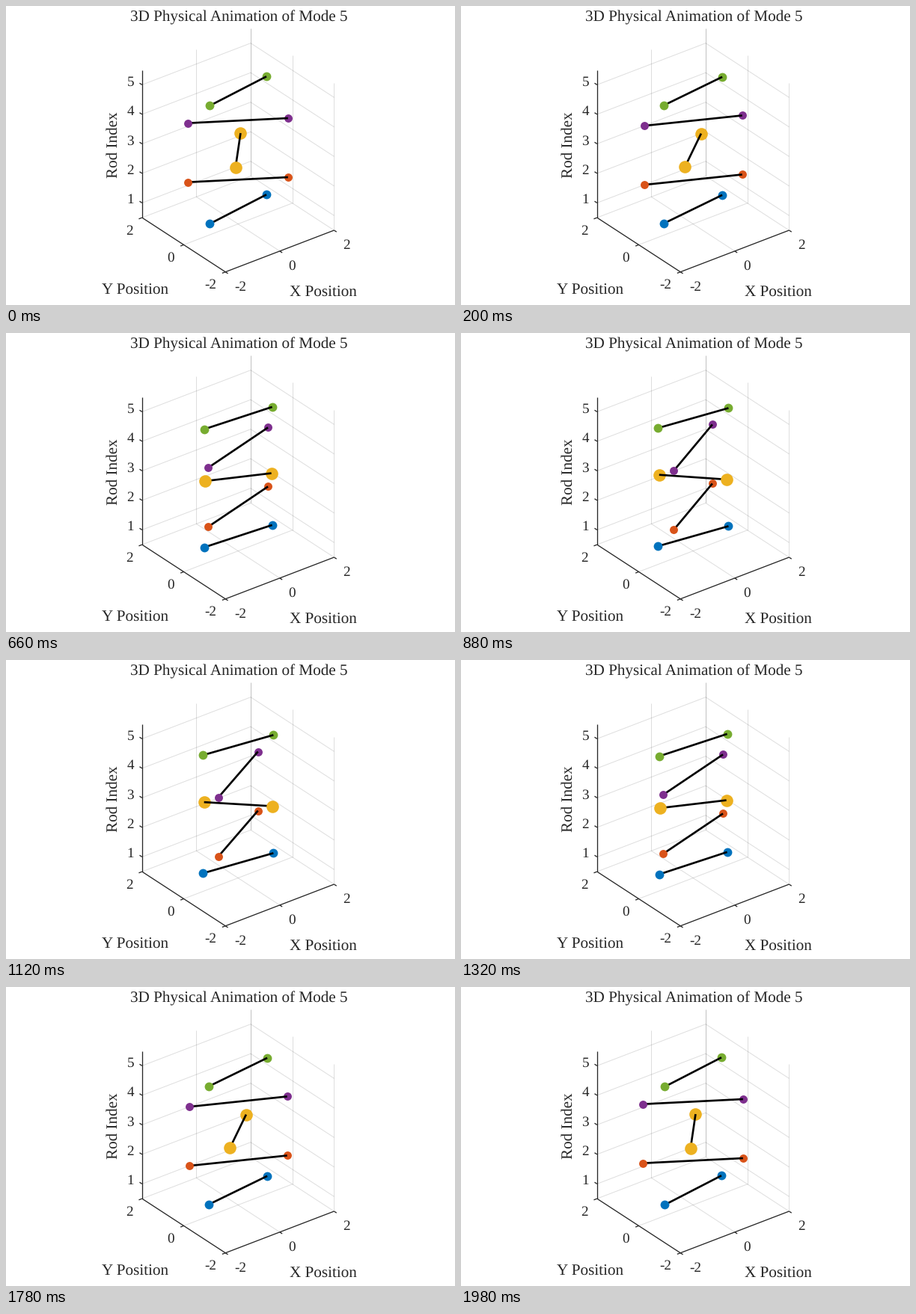
Write a matplotlib script that moves like this. It is 600 by 400 pixels and loops after 2000 ms.

```python
import numpy as np
import matplotlib.pyplot as plt
from matplotlib.animation import FuncAnimation

W, H, DPI = 600, 400, 100
PT = 72 / DPI                      # points per pixel
FRAMES, LOOP = 100, 2000

plt.rcParams.update({
    "font.family": "Liberation Serif",
    "text.hinting": "no_hinting",
    "axes.unicode_minus": False,
})

# Orthographic view: azimuth -37.5 deg, elevation 30 deg
AZ, EL = np.radians(37.5), np.radians(30)
SCALE, Z_SCALE = 45.75, 39.5
CENTER = np.array([310.1, 291.6])  # screen point of (0, 0, 0.5)

INK = "#262626"
TICK_FONT, LABEL_FONT = 19.2, 21.1              # px
COLORS = ["#0072BD", "#D95319", "#EDB120", "#7E2F8E", "#77AC30"]
HALF = [1.19, 1.465, 1.0, 1.465, 1.19]          # half length of each rod
SWING = np.radians([8.4, -31.8, 48.3, -31.8, 8.4])  # mode shape
SIZES = [11.8, 10.9, 16.6, 10.9, 11.8]          # marker diameter in px


def project(x, y, z):
    u = SCALE * (x * np.cos(AZ) - y * np.sin(AZ))
    v = SCALE * np.sin(EL) * (x * np.sin(AZ) + y * np.cos(AZ))
    return np.array([CENTER[0] + u, CENTER[1] - v - Z_SCALE * (z - 0.5)])


fig = plt.figure(figsize=(W / DPI, H / DPI), dpi=DPI, facecolor="white")
ax = fig.add_axes([0, 0, 1, 1])
ax.set(xlim=(0, W), ylim=(H, 0))
ax.axis("off")


def segment(a, b, **style):
    p, q = project(*a), project(*b)
    ax.plot([p[0], q[0]], [p[1], q[1]], solid_capstyle="butt", **style)


def grid(a, b):
    segment(a, b, color=INK, alpha=0.15, lw=1 * PT, zorder=1)


def axis(a, b):
    segment(a, b, color=INK, lw=1.3 * PT, zorder=2)


def label(x, y, text, size=LABEL_FONT, ha="center", rotation=0):
    ax.text(x, y, text, fontsize=size * PT, color=INK, ha=ha, va="baseline",
            rotation=rotation, rotation_mode="anchor", zorder=2)


def tick_label(point, dx, dy, value, ha):
    x, y = project(*point)
    label(x + dx, y + dy, str(value), TICK_FONT, ha)


LO, HI, Z0, Z1 = -2, 2, 0.5, 5.5
TICK = 0.12

for v in (-2, 0, 2):
    if v > LO:
        grid((v, LO, Z0), (v, HI, Z0))
        grid((v, HI, Z0), (v, HI, Z1))
        grid((LO, v, Z0), (HI, v, Z0))
    grid((HI, v, Z0), (HI, v, Z1))
    axis((v, LO, Z0), (v, LO - TICK, Z0))
    axis((LO, v, Z0), (LO - TICK, v, Z0))
    tick_label((v, LO, Z0), 11.7, 24.9, v, "left")
    tick_label((LO, v, Z0), -12.4, 22.6, v, "right")

for k in range(1, 6):
    grid((LO, HI, k), (HI, HI, k))
    grid((HI, LO, k), (HI, HI, k))
    axis((LO, HI, k), (LO, HI + TICK, k))
    tick_label((LO, HI, k), -10.8, 1, k, "right")

axis((LO, LO, Z0), (HI, LO, Z0))
axis((LO, LO, Z0), (LO, HI, Z0))
axis((LO, HI, Z0), (LO, HI, Z1))

label(311, 20, "3D Physical Animation of Mode 5")
label(172.8, 385.4, "Y Position")
label(423.6, 389, "X Position")
label(149, 185.3, "Rod Index", rotation=90)


def dot(color, size, zorder):
    return ax.plot([], [], "o", color=color, ms=size * PT, mew=0,
                   zorder=zorder)[0]


# The far end lies behind its rod, the near end in front of it
rods = [ax.plot([], [], color="black", lw=2.67 * PT, zorder=4,
                solid_capstyle="butt")[0] for _ in COLORS]
far = [dot(c, s, 3) for c, s in zip(COLORS, SIZES)]
near = [dot(c, s, 5) for c, s in zip(COLORS, SIZES)]


def update(i):
    phase = np.cos(2 * np.pi * i / (FRAMES - 1))
    for k in range(len(COLORS)):
        a = SWING[k] * phase
        dx, dy = HALF[k] * np.cos(a), HALF[k] * np.sin(a)
        ends = [project(-dx, -dy, k + 1), project(dx, dy, k + 1)]
        back, front = sorted(ends, key=lambda p: p[1])
        rods[k].set_data([back[0], front[0]], [back[1], front[1]])
        far[k].set_data([back[0]], [back[1]])
        near[k].set_data([front[0]], [front[1]])
    return rods + far + near


anim = FuncAnimation(fig, update, frames=FRAMES, interval=LOOP / FRAMES,
                     repeat=True, repeat_delay=0)
plt.show()
```
